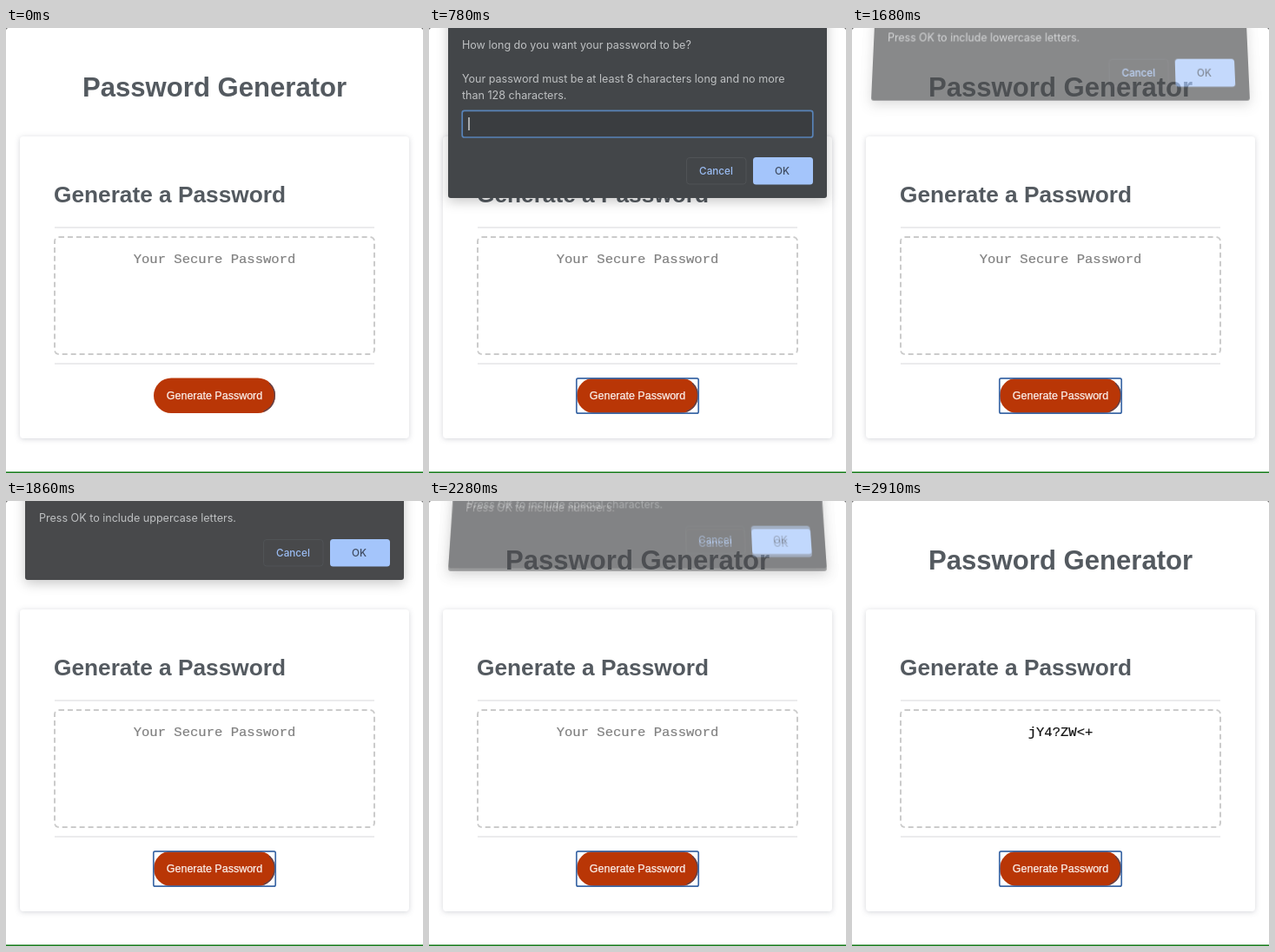
Write an HTML page that moves like this. It is 480 by 513 pixels and loops after 2.94 s.

```html
<!DOCTYPE html>
<html lang="en">
<head>
<meta charset="utf-8">
<title>Password Generator</title>
<style>
  html, body { margin: 0; width: 100%; height: 100%; overflow: hidden; background: #fff; }
  #stage { position: relative; width: 480px; height: 513px; overflow: hidden; }
  #stage > * { position: absolute; }
  #page { left: 0; top: 0; }
  text { font-family: "Liberation Sans", Arial, sans-serif; }
  .head { font-weight: bold; fill: #545a60; }
  .mono { font: 15.55px "Liberation Mono", "Courier New", monospace; text-anchor: middle; stroke-width: .2; }
  .card { fill: #fff; filter: drop-shadow(0 1px 3px rgba(40, 45, 70, .2)); }
  #box {
    left: 55px; top: 240px; width: 370px; height: 137px; box-sizing: border-box;
    border: 2px dashed #cbcbcb; border-radius: 6px;
  }
  .dialog { left: 22px; top: -70px; overflow: visible; transform-origin: 50% 100%; }
  .dialog text { font: 12.55px Inter, "Noto Sans", sans-serif; fill: #bec0c2; }
  .dialog .sheet { filter: drop-shadow(0 4px 7px rgba(0, 0, 0, .22)); }
  .dialog .label { font-size: 11.7px; font-weight: 500; text-anchor: middle; }
</style>
</head>
<body>
<div id="stage">
  <svg id="page" width="480" height="513">
    <path d="M0 0h2l-2 2zM480 0h-2l2 2z" fill="#777"/>
    <text class="head" x="88" y="78.7" font-size="31.1">Password Generator</text>
    <rect class="card" x="16" y="125" width="448" height="348" rx="4"/>
    <text class="head" x="55" y="200.6" font-size="26.25">Generate a Password</text>
    <path d="M56 230h368M56 387h368" stroke="#e5e5e7" stroke-width="1.5"/>
    <text class="mono" id="output" x="240" y="270.7"></text>
    <rect x="170" y="403.5" width="140" height="40.5" rx="20.2" fill="#b93606"/>
    <path d="M303.2 409.5A19.6 19.6 0 0 1 296.5 442.1" fill="none" stroke="#5d4450" stroke-width="1.3"/>
    <text x="240" y="427.7" font-size="12.5" text-anchor="middle" fill="#fbf1ed" stroke="#fbf1ed" stroke-width=".25">Generate Password</text>
    <rect id="ring" x="169.8" y="403.8" width="140.4" height="40.4" rx="2" fill="none" stroke="#3c68a6" stroke-width="1.7"/>
    <rect y="511.5" width="480" height="1.5" fill="#147a18"/>
  </svg>
  <div id="box"></div>
</div>
<script>
const LOOP = 2940, STEP = 30, FADE = 155, ABOVE = 70;
const TYPED = 990, DONE = 2490;
const stage = document.getElementById("stage");
const output = document.getElementById("output");
const ring = document.getElementById("ring");

const line = (y, s) => `<text x="38" y="${y}">${s}</text>`;

const buttons = bottom => {
  const top = bottom - 47, base = bottom - 27.3;
  return `
    <rect x="296.5" y="${top + .5}" width="68.5" height="30.5" rx="3.5" fill="none" stroke="#505356"/>
    <text class="label" x="330.5" y="${base}" style="fill:#9bbdf4">Cancel</text>
    <rect x="373" y="${top}" width="69" height="31.5" rx="3.5" fill="#a4c5fb"/>
    <text class="label" x="406.5" y="${base}" style="fill:#3f4b60">OK</text>`;
};

function makeDialog(bottom, color, opens, closes, body) {
  const h = bottom + ABOVE;
  stage.insertAdjacentHTML("beforeend", `
    <svg class="dialog" width="436" height="${h}" viewBox="22 ${-ABOVE} 436 ${h}">
      <rect class="sheet" x="22" y="${-ABOVE}" width="436" height="${h}" rx="3" fill="${color}"/>
      ${body}${buttons(bottom)}
    </svg>`);
  return { el: stage.lastElementChild, h, opens, closes };
}

const confirmBox = (what, opens, closes) =>
  makeDialog(91, "#48494b", opens, closes, line(23.7, `Press OK to include ${what}.`));

const PROMPT_CLOSES = 1348;
const dialogs = [
  makeDialog(196, "#434649", 270, PROMPT_CLOSES,
    line(24.3, "How long do you want your password to be?") +
    line(62.7, "Your password must be at least 8 characters long and no more") +
    line(82.3, "than 128 characters.") + `
    <rect id="field" x="38.2" y="95.4" width="403.6" height="30.6" rx="2.5" fill="#3a3d40" stroke-width="1.7"/>
    <text id="typed" x="45" y="115.3" style="fill:#fff">8</text>
    <rect id="caret" y="103" width="1.2" height="15" fill="#f1f2f3"/>`),
  confirmBox("lowercase letters", 1335, 1626),
  confirmBox("uppercase letters", 1690, 1940),
  confirmBox("numbers", 1955, 2205),
  confirmBox("special characters", 2225, 2530)
];
const [field, typed, caret] = ["field", "typed", "caret"].map(id => document.getElementById(id));

const clamp = v => Math.max(0, Math.min(1, v));
const show = (el, on) => { el.style.visibility = on ? "visible" : "hidden"; };

// The sheet tilts back, lifts and fades about its lower edge.
function pose({ el, h, opens, closes }, t) {
  const a = Math.min(clamp((t - opens) / FADE), clamp(1 - (t - closes) / FADE));
  const away = 1 - a;
  el.style.display = a > 0 ? "block" : "none";
  el.style.opacity = a;
  el.style.transform = away
    ? `matrix3d(1,0,0,0, 0,${1 + .1 * away},0,${-.1 * away / h}, 0,0,1,0, 0,${-21 * away},0,1)`
    : "none";
}

function draw(now) {
  const t = Math.floor((now % LOOP) / STEP) * STEP;
  const focused = t < PROMPT_CLOSES, hasDigit = t >= TYPED, done = t >= DONE;
  const ink = done ? "#111" : "#808080";
  dialogs.forEach(d => pose(d, t));
  field.setAttribute("stroke", focused ? "#5883b8" : "#4a4d50");
  typed.textContent = hasDigit ? "8" : "";
  caret.setAttribute("x", hasDigit ? 54 : 45.4);
  caret.setAttribute("opacity", focused ? 1 : 0);
  output.textContent = done ? "jY4?ZW<+" : "Your Secure Password";
  output.setAttribute("fill", ink);
  output.setAttribute("stroke", ink);
  show(ring, (t >= 240 && t < DONE) || t >= 2640);
}

const start = performance.now();
function tick() {
  draw(performance.now() - start);
  requestAnimationFrame(tick);
}
tick();
</script>
</body>
</html>
```
